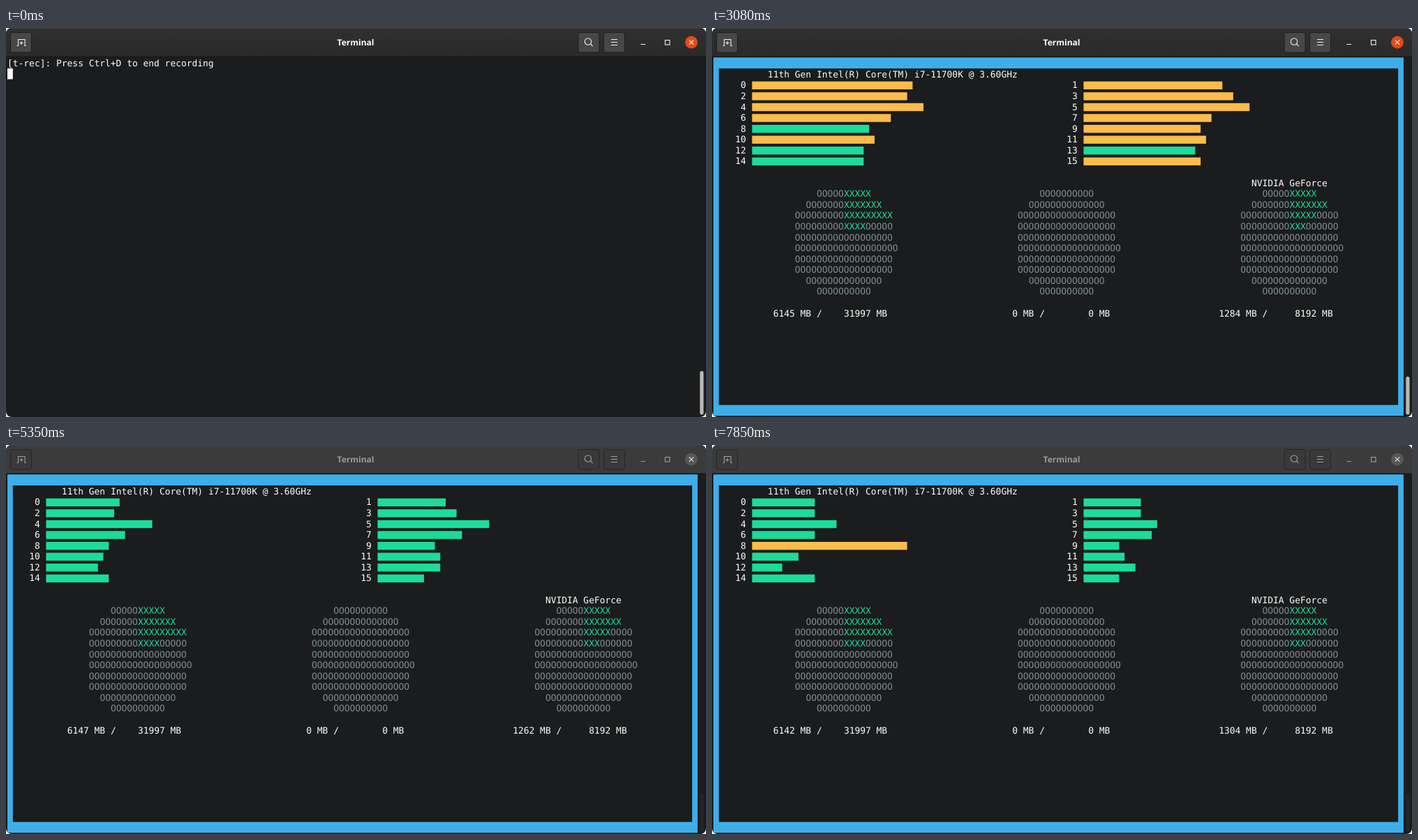
Animation, 1003 px wide and 558 px high, one loop 8 s. Source, as an HTML page:

```html
<!DOCTYPE html>
<html lang="en">
<head>
<meta charset="utf-8">
<title>Terminal</title>
<style>
  html, body { margin: 0; width: 100%; height: 100%; overflow: hidden; background: #fff; }
  svg { display: block; width: 1003px; height: 558px; border-radius: 8px; background: #1a1c1d; }
  text { white-space: pre; text-rendering: geometricPrecision; }
  #screen text { font: 12.935px "DejaVu Sans Mono", monospace; fill: #fcfcfc; }
  #screen .off { fill: #7f8c8d; }
  #screen .on { fill: #1cdc9a; }
  .title { font: 700 12px "Open Sans", sans-serif; text-anchor: middle; fill: #fff; }
  .bar { fill: url(#lit); }
  .btn { fill: #474747; stroke: #1f1f1f; }
  .icon { fill: none; stroke: #f2f2f2; stroke-width: 1.1; }
  .close { fill: #e2491b; }
  .thumb { fill: #b8b8b6; }
  .idle .title { fill: #9b9b9b; }
  .idle .bar { fill: #3b3b3b; }
  .idle .btn { fill: #393939; stroke: #262626; }
  .idle .icon { stroke: #a0a0a0; }
  .idle .close { fill: #575757; }
  .idle .cross { stroke: #e6e6e6; }
  .idle .thumb { fill: #242627; }
</style>
</head>
<body>
<svg id="win" viewBox="0 0 1003 558">
  <defs>
    <linearGradient id="lit" x2="0" y2="1">
      <stop stop-color="#303030"/><stop offset="1" stop-color="#2a2a2a"/>
    </linearGradient>
  </defs>

  <rect class="bar" width="1003" height="41"/>
  <path d="M0 .5H1003" stroke="#444"/>
  <path d="M0 41H1003" stroke="#181818"/>
  <text class="title" x="501" y="25">Terminal</text>
  <rect class="btn" x="6.5" y="6.5" width="30" height="28.5" rx="3"/>
  <rect class="btn" x="820" y="6.5" width="30" height="28.5" rx="3"/>
  <rect class="btn" x="856.5" y="6.5" width="30" height="28.5" rx="3"/>
  <path class="icon" d="M15.5 25.5h2v-9h9.5v9h2M22 19v5M19.5 21.5h5"/>
  <circle class="icon" cx="834" cy="19.5" r="4.7"/>
  <path class="icon" d="M837.5 23l3.2 3.2M867 16.5h9M867 20.5h9M867 24.5h9M909.5 23.5h6.5"/>
  <rect class="icon" x="944.5" y="17.5" width="6.5" height="6.5"/>
  <circle class="close" cx="982" cy="20.5" r="9"/>
  <path class="icon cross" d="M978.8 17.3l6.4 6.4m0-6.4l-6.4 6.4"/>

  <g id="screen">
    <g id="shell"></g>
    <g id="monitor"></g>
  </g>
  <rect class="thumb" id="thumb" x="994.3" width="5.2" rx="2.6"/>
</svg>
<script>
const CW = 7.787, CH = 15.575, X0 = 2, Y0 = 42.3;
const $ = id => document.getElementById(id);

const TICKS = [0, 250, 510, 760, 1020, 1280, 1540, 1790, 2050, 2310, 2560,
  2820, 3080, 3330, 3590, 3840, 4090, 4340, 4600, 4850, 5100, 5350, 5600,
  5850, 6100, 6350, 6600, 6850, 7100, 7350, 7600, 7850];

// Load per core in cells (cores 0 to 15), then memory used by system and card.
const SAMPLES = [
  { t: 3080, cores: [30, 26, 29, 28, 32, 31, 26, 24, 22, 22.6, 23, 23, 21, 21, 21, 22.6], ram: 6145, gpu: 1284 },
  { t: 4090, cores: [20, 17, 20, 20, 24, 20, 19, 20, 17, 16, 16, 17, 17, 16, 16, 15], ram: 6133, gpu: 1277 },
  { t: 5350, cores: [14, 13, 13, 15, 20, 21, 15, 16, 12, 11, 11, 12, 10, 12, 12, 9], ram: 6147, gpu: 1262 },
  { t: 6850, cores: [8, 13, 10, 15, 18, 16, 13, 15, 8, 9, 8, 8, 6, 8, 10, 11], ram: 6143, gpu: 1281 },
  { t: 7850, cores: [12, 11, 12, 11, 16, 14, 12, 13, 29, 7, 9, 8, 6, 10, 12, 7], ram: 6142, gpu: 1304 }
];

function add(parent, tag, attrs) {
  const el = document.createElementNS("http://www.w3.org/2000/svg", tag);
  for (const k in attrs) el.setAttribute(k, attrs[k]);
  return parent.appendChild(el);
}

function write(parent, col, row, str, cls = "") {
  const el = add(parent, "text", { x: X0 + col * CW, y: Y0 + row * CH + 13, class: cls });
  el.textContent = str;
  return el;
}

const shell = $("shell"), monitor = $("monitor");
const prompt = write(shell, 0, 0, "[t-rec]: Press Ctrl+D to end recording");
const cursor = add(shell, "rect", { x: X0, width: CW, height: CH, fill: "#fff" });

// Blue border, one cell wide, around 127 by 33 cells.
add(monitor, "path", {
  fill: "#3daee9", "fill-rule": "evenodd",
  d: `M${X0} ${Y0}h${127 * CW}v${33 * CH}h${-127 * CW}zm${CW} ${CH}h${125 * CW}v${31 * CH}h${-125 * CW}z`
});
write(monitor, 10, 1, "11th Gen Intel(R) Core(TM) i7-11700K @ 3.60GHz");
write(monitor, 99, 11, "NVIDIA GeForce");

const bars = SAMPLES[0].cores.map((_, i) => {
  const row = 2 + (i >> 1), right = i % 2;
  write(monitor, right ? 65 : 4, row, String(i).padStart(2));
  return add(monitor, "rect", {
    x: X0 + (right ? 68 : 7) * CW + 0.9, y: Y0 + row * CH + 3.2, height: 11.4
  });
});

// A dial is a disc of O with the used share marked by X from the middle.
const WIDTHS = [10, 14, 18, 18, 18, 19, 18, 18, 14, 10];
function dial(col, used) {
  WIDTHS.forEach((n, i) => {
    const start = col - Math.floor((n - 10) / 2), half = n >> 1, x = used[i] || 0, row = 12 + i;
    if (!x) return write(monitor, start, row, "O".repeat(n), "off");
    write(monitor, start, row, "O".repeat(half), "off");
    write(monitor, start + half, row, "X".repeat(x), "on");
    write(monitor, start + half + x, row, "O".repeat(n - half - x), "off");
  });
}
dial(19, [5, 7, 9, 4]);
dial(60, []);
dial(101, [5, 7, 5, 3]);

function memory(col, total) {
  write(monitor, col + 4, 23, " MB /");
  write(monitor, col + 13, 23, total.padStart(5) + " MB");
  return write(monitor, col, 23, "");
}
const ram = memory(11, "31997");
const swap = memory(52, "0");
const gpu = memory(93, "8192");
swap.textContent = "   0";

function sampleAt(t) {
  const first = SAMPLES[0], last = SAMPLES[SAMPLES.length - 1];
  if (t <= first.t) return first;
  if (t >= last.t) return last;
  const i = SAMPLES.findIndex(s => s.t > t), a = SAMPLES[i - 1], b = SAMPLES[i];
  const mix = (p, q) => p + (q - p) * (t - a.t) / (b.t - a.t);
  return {
    cores: a.cores.map((v, k) => mix(v, b.cores[k])),
    ram: mix(a.ram, b.ram), gpu: mix(a.gpu, b.gpu)
  };
}

const show = (el, on) => el.setAttribute("visibility", on ? "visible" : "hidden");

function draw(t) {
  const cleared = t >= 1540, running = t >= 2050;
  show(shell, !running);
  show(prompt, !cleared);
  show(monitor, running);
  const row = cleared ? 6 : t >= 1020 ? 3 : t >= 510 ? 2 : 1;
  cursor.setAttribute("y", Y0 + row * CH);

  const top = cleared ? 500 : 492;
  $("thumb").setAttribute("y", top);
  $("thumb").setAttribute("height", 554.5 - top);
  $("win").classList.toggle("idle", t >= 4600);

  const s = sampleAt(t);
  s.cores.forEach((v, i) => {
    bars[i].setAttribute("width", Math.floor(v + 1e-6) * CW - 3.6);
    bars[i].setAttribute("fill", v > 22.5 ? "#fdbc4b" : "#1cdc9a");
  });
  ram.textContent = Math.round(s.ram);
  gpu.textContent = Math.round(s.gpu);
}

const begin = performance.now();
let shown = -1;
function frame() {
  const t = (performance.now() - begin) % 8000;
  const tick = TICKS.filter(x => x <= t).pop();
  if (tick !== shown) draw(shown = tick);
  requestAnimationFrame(frame);
}
frame();
</script>
</body>
</html>
```
